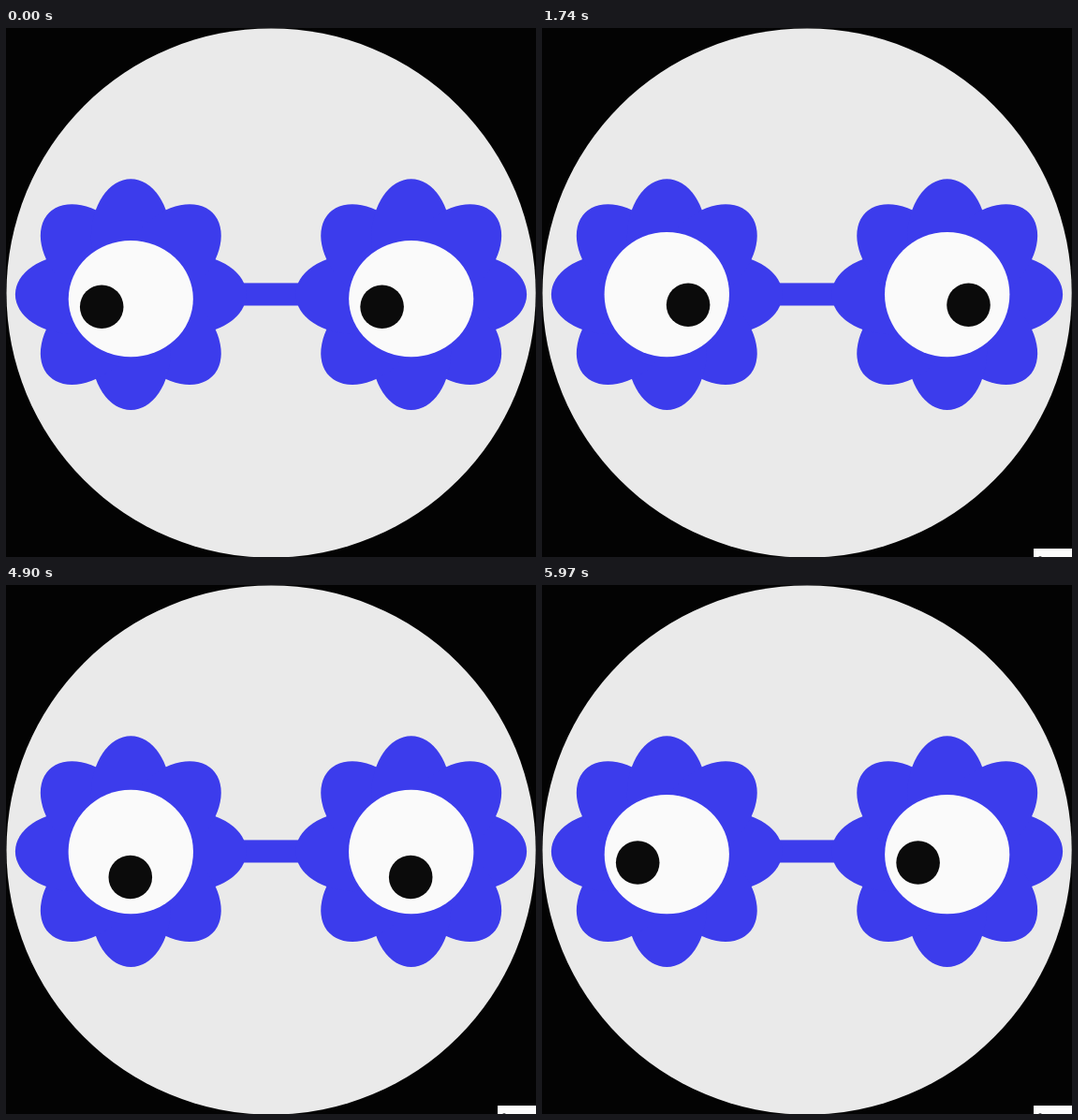
Recreate the animation shown at these times as an HTML page with a canvas. Size 566 by 565 pixels, loop 6.04 s.

```html
<!DOCTYPE html>
<html lang="en">
<head>
<meta charset="utf-8">
<title>Flower glasses</title>
<style>
  html, body { margin: 0; width: 100%; height: 100%; overflow: hidden; background: #030303; }
  canvas { display: block; }
</style>
</head>
<body>
<canvas id="stage" width="566" height="565"></canvas>
<script>
const ctx = document.getElementById('stage').getContext('2d');
const BLACK = '#030303', FACE = '#eaeaea', BLUE = '#3c3cec', WHITE = '#fafafa', PUPIL = '#0b0b0b';

const LOOP = 6040;
const STEP = 67;          // ms between drawn poses
const MOVE = 300;         // length of every eye movement
const FIRST_GLANCE = 300;
const BEAT = 1140;        // time from one glance to the next
const SQUINT_AT = FIRST_GLANCE + 4 * BEAT;
const LEFT_AT = 5128;
const OPEN_AT = 5749;
const CYCLE = 5942;       // the eyes repeat slightly faster than the loop
const PANEL_AT = 1070;

const EYE = { x: 133.3, y: 284.6, radius: 66.7, gap: 299.4 };
const GLANCES = [
  { x: 135.1, y: 286.3 },
  { x: 156.1, y: 295.8 },
  { x: 132.8, y: 312 }
];

const clamp = x => Math.min(1, Math.max(0, x));
const mix = (a, b, p) => a + (b - a) * p;
const moved = (t, start) => (1 - Math.cos(Math.PI * clamp((t - start) / MOVE))) / 2;
const blend = (a, b, p) => ({ x: mix(a.x, b.x, p), y: mix(a.y, b.y, p) });

function poseAt(t) {
  const squint = 1 - moved(t, OPEN_AT - CYCLE) + moved(t, SQUINT_AT) - moved(t, OPEN_AT);
  const left = { x: 102.2, y: 294 + 13.5 * squint };
  const glanced = GLANCES.reduce(
    (from, to, i) => blend(from, to, moved(t, FIRST_GLANCE + i * BEAT)), left);
  return { squint, pupil: blend(glanced, left, moved(t, LEFT_AT)) };
}

function ellipse(x, y, rx, ry, color) {
  ctx.fillStyle = color;
  ctx.beginPath();
  ctx.ellipse(x, y, rx, ry, 0, 0, Math.PI * 2);
  ctx.fill();
}

function rect(x, y, w, h, color) {
  ctx.fillStyle = color;
  ctx.fillRect(x, y, w, h);
}

function flower(x, y) {
  ctx.save();
  ctx.translate(x, y);
  for (let i = 0; i < 8; i++) {
    ellipse(60, 0, 63.4, 42.6, BLUE);
    ctx.rotate(Math.PI / 4);
  }
  ctx.restore();
}

function eye(offset, { squint, pupil }) {
  const height = EYE.radius - 16.2 * squint;
  const x = EYE.x + offset;
  flower(x, EYE.y);
  ellipse(x, EYE.y + EYE.radius - height, EYE.radius - 0.5 * squint, height, WHITE);
  ellipse(pupil.x + offset, pupil.y, 23.3, 23.3, PUPIL);
}

function cornerPanel(t) {
  ctx.globalAlpha = clamp(0.07 + (t - PANEL_AT) / (2 * STEP));
  rect(525, 556, 41, 9, '#fcfcfc');
  ellipse(532, 566, 2, 1.8, '#222');
  ctx.globalAlpha = 1;
}

function draw(t) {
  const pose = poseAt(t);
  rect(0, 0, 566, 565, BLACK);
  ellipse(283.1, 283, 282.6, 282.6, FACE);
  rect(245, 272.4, 75, 24.1, BLUE);
  eye(0, pose);
  eye(EYE.gap, pose);
  if (t >= PANEL_AT) cornerPanel(t);
}

let origin;
function tick(now) {
  origin ??= now;
  const t = (now - origin) % LOOP;
  draw(Math.floor((t + 10) / STEP) * STEP);
  requestAnimationFrame(tick);
}
draw(0);
requestAnimationFrame(tick);
</script>
</body>
</html>
```
